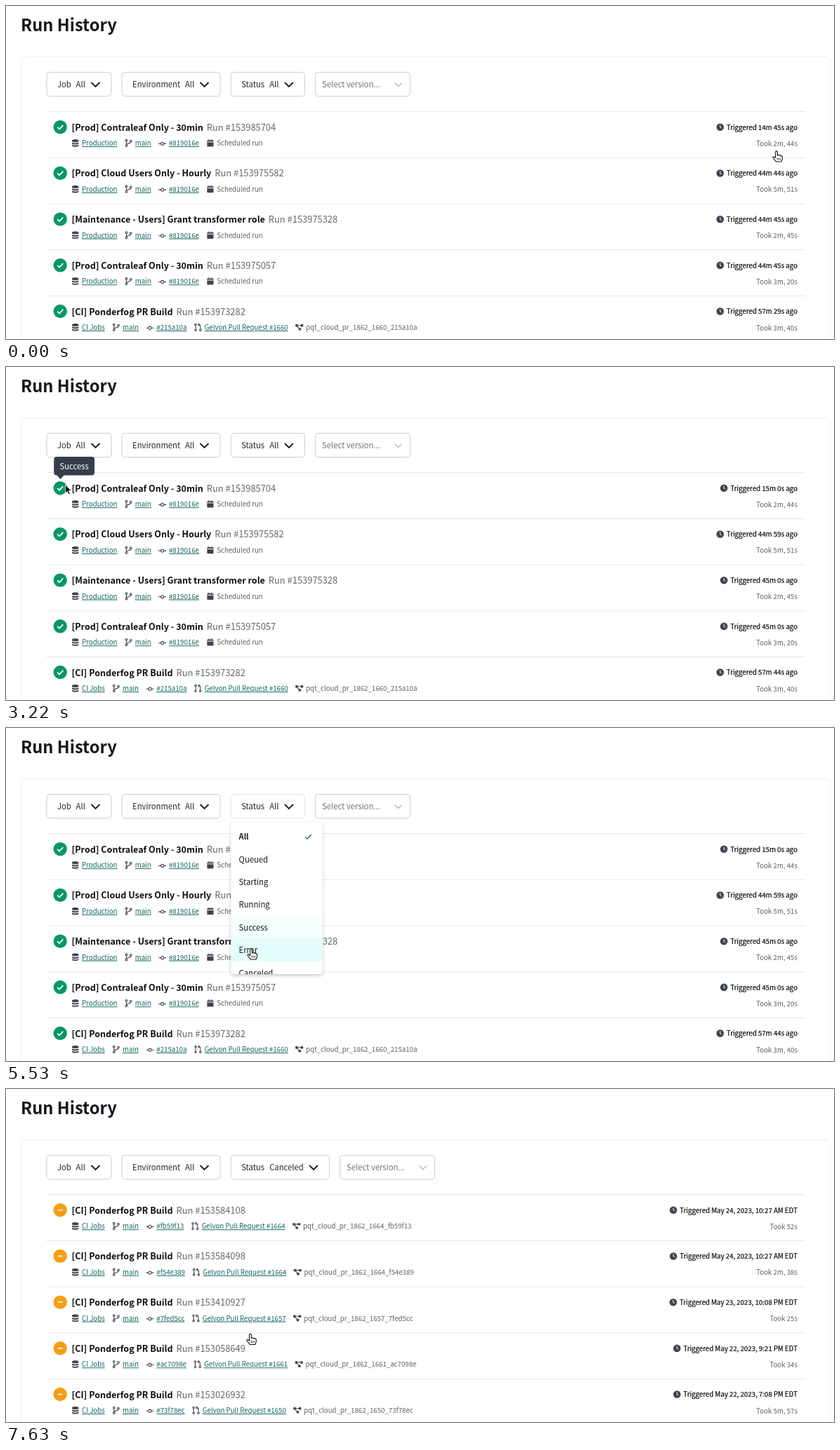
Write an HTML page that moves like this. It is 1179 by 475 pixels and loops after 8000 ms.

```html
<!DOCTYPE html>
<html lang="en">
<head>
<meta charset="utf-8">
<title>Run History</title>
<style>
  html, body { margin: 0; height: 100%; overflow: hidden; background: #fff; }
  svg { display: block; width: 100%; height: 100%; }
  text { font-family: "Noto Sans CJK JP", "Noto Sans CJK SC", "Noto Sans CJK KR", "Noto Sans", sans-serif; white-space: pre; }
  .h1 { font-size: 23.7px; font-weight: 700; fill: #15171c; }
  .title { font-size: 12.53px; font-weight: 700; fill: #0d0f12; }
  .run { font-size: 12.9px; fill: #62666e; }
  .small { font-size: 9.68px; fill: #5c6068; }
  .link { font-size: 9.68px; fill: #116560; text-decoration: underline; }
  .when { font-size: 9.68px; fill: #0b0c0e; stroke: #0b0c0e; stroke-width: .22px; }
  .ui { font-size: 11.28px; fill: #23272f; }
  .item { font-size: 11.28px; fill: #15171c; }
  .bold { font-size: 11px; font-weight: 700; fill: #15171c; }
  .hint { font-size: 11.28px; fill: #6f737b; }
  .tip { font-size: 11.28px; fill: #fff; }
  .fill { fill: #3f4450; }
  .line { fill: none; stroke: #3f4450; stroke-width: 1.1; }
</style>
</head>
<body>
<svg id="stage" viewBox="0 0 1179 475">
  <defs>
    <filter id="shade" x="-20%" y="-20%" width="140%" height="140%">
      <feDropShadow dx="0" dy="2" stdDeviation="2.5" flood-color="#000" flood-opacity=".22"/>
    </filter>
    <clipPath id="menuClip"><rect x="320.5" y="135" width="130" height="216" rx="4"/></clipPath>
  </defs>
</svg>
<script>
const NS = 'http://www.w3.org/2000/svg';
const stage = document.getElementById('stage');

function add(parent, tag, attrs = {}) {
  const el = document.createElementNS(NS, tag);
  for (const k in attrs) el.setAttribute(k, attrs[k]);
  return parent.appendChild(el);
}
const group = (parent = stage, attrs) => add(parent, 'g', attrs);
const path = (parent, d, attrs) => add(parent, 'path', { d, ...attrs });

function text(parent, str, x, y, cls, anchor = 'start') {
  const el = add(parent, 'text', { x, y, class: cls, 'text-anchor': anchor });
  el.textContent = str;
  return el.getComputedTextLength();
}

const disc = (x, y, r) => `M${x - r} ${y}a${r} ${r} 0 1 0 ${2 * r} 0a${r} ${r} 0 1 0 ${-2 * r} 0`;

// Each icon is centred on 0,0: filled shape, dark strokes, white strokes
const icons = {
  database: ['M-4.7-3.7c0-2 9.4-2 9.4 0v1c0 2-9.4 2-9.4 0z' +
    'M-4.7-.9c2 1.4 7.4 1.4 9.4 0v1.5c0 2-9.4 2-9.4 0z' +
    'M-4.7 2.4c2 1.4 7.4 1.4 9.4 0v1.4c0 2-9.4 2-9.4 0z'],
  branch: ['', disc(-3, -3.7, 1.3) + disc(-3, 3.9, 1.3) + disc(3.3, -2.7, 1.3) +
    'M-3-2.4v5M3.3-1.4C3.3 1.2-2.6.2-3 2.6'],
  commit: ['', disc(0, 1, 2.1) + 'M-5.5 1h3.4M2.1 1h3.4'],
  calendar: ['M-4.6-3.8h2v-1.4h1.3v1.4h2.6v-1.4h1.3v1.4h2v8q0 .9-.9.9h-7.4q-.9 0-.9-.9z', '', 'M-4.6-1.5h9.2'],
  pull: ['', disc(-3.4, -3.6, 1.2) + disc(-3.4, 4, 1.2) + disc(3.4, 4, 1.2) +
    'M-3.4-2.4v5.2M3.4 2.8v-4.6q0-1.8-1.8-1.8h-1.4M2-5.4L.2-3.6 2-1.8'],
  diagram: ['M-5.5-4.2h3.4v3.4h-3.4zM2.1-4.2h3.4v3.4h-3.4zM-1 1h3.4v3.4h-3.4z', 'M-2.5-2.5h5M-3.2-1.4L.4 2.4'],
  clock: [disc(0, 0, 5.3), '', 'M0-3.2v3.4l2.1 1.2']
};
function icon(parent, name, x, y) {
  const [solid, dark, light] = icons[name];
  const g = group(parent, { transform: `translate(${x} ${y})` });
  if (solid) path(g, solid, { class: 'fill' });
  if (dark) path(g, dark, { class: 'line' });
  if (light) path(g, light, { fill: 'none', stroke: '#fff' });
}

const ago = s => `Triggered ${Math.floor(s / 60)}m ${s % 60}s ago`;

function runRow(parent, i, [title, id, hash, pr, when, took], canceled) {
  const g = group(parent, { transform: `translate(0 ${i * 65.7})` });
  path(g, 'M57.5 150.7H1138', { stroke: '#e4e6e9' });
  add(g, 'circle', { cx: 77.2, cy: 172.7, r: 9.7, fill: canceled ? '#f59e14' : '#069669' });
  path(g, canceled ? 'M74 172.7h6.4' : 'M73.2 172.9l2.8 2.8 5.3-5.6',
    { fill: 'none', stroke: '#fff', 'stroke-width': 1.7 });
  const w = text(g, title, 93.5, 177.8, 'title');
  text(g, 'Run #' + id, 93.5 + w + 5, 177.8, 'run');

  const parts = [['database', pr ? 'CI Jobs' : 'Production', 'link'], ['branch', 'main', 'link'], ['commit', '#' + hash, 'link']];
  if (pr) parts.push(['pull', `Gelvon Pull Request #${pr}`, 'link'], ['diagram', `pqt_cloud_pr_1862_${pr}_${hash}`, 'small']);
  else parts.push(['calendar', 'Scheduled run', 'small']);
  let x = 98.7;
  for (const [name, label, cls] of parts) {
    icon(g, name, x, 195.4);
    x += 9.3;
    x += text(g, label, x, 199.2, cls) + 16;
  }
  const len = text(g, when, 1127, 176.6, 'when', 'end');
  icon(g, 'clock', 1127 - len - 9.2, 172.8);
  text(g, 'Took ' + took, 1127, 199.8, 'small', 'end');
}

const runs = [
  ['[Prod] Contraleaf Only - 30min', 153985704, '819016e', 0, 885, '2m, 44s'],
  ['[Prod] Cloud Users Only - Hourly', 153975582, '819016e', 0, 2684, '5m, 51s'],
  ['[Maintenance - Users] Grant transformer role', 153975328, '819016e', 0, 2685, '2m, 45s'],
  ['[Prod] Contraleaf Only - 30min', 153975057, '819016e', 0, 2685, '3m, 20s'],
  ['[CI] Ponderfog PR Build', 153973282, '215a10a', 1660, 3449, '3m, 40s']
];
const canceledRuns = [
  [153584108, 'fb59f13', 1664, '24, 2023, 10:27 AM', '52s'],
  [153584098, 'f54e389', 1664, '24, 2023, 10:27 AM', '2m, 38s'],
  [153410927, '7fed5cc', 1657, '23, 2023, 10:08 PM', '25s'],
  [153058649, 'ac7098e', 1661, '22, 2023, 9:21 PM', '34s'],
  [153026932, '73f78ec', 1650, '22, 2023, 7:08 PM', '5m, 57s']
];

function runList(delay) {
  const g = group();
  runs.forEach(([title, id, hash, pr, secs, took], i) =>
    runRow(g, i, [title, id, hash, pr, ago(secs + delay), took]));
  return g;
}

// Page frame
text(stage, 'Run History', 21, 36.3, 'h1');
add(stage, 'rect', { x: 21.5, y: 72.5, width: 1152, height: 440, rx: 7, fill: 'none', stroke: '#f3f4f5', 'stroke-width': 1.4 });

const lists = [runList(0), runList(15), group()];
canceledRuns.forEach(([id, hash, pr, day, took], i) =>
  runRow(lists[2], i, ['[CI] Ponderfog PR Build', id, hash, pr, `Triggered May ${day} EDT`, took], true));

// Filters
function filter(parent, x, width, label, value, valueX) {
  const box = add(parent, 'rect', { x, y: 94.6, width, height: 34, rx: 4.5, fill: '#fff', stroke: '#d3d6db', 'stroke-width': 1.2 });
  text(parent, label, x + (value ? 15 : 9.6), 116.2, value ? 'ui' : 'hint');
  if (value) text(parent, value, valueX, 116.2, 'ui');
  const cx = x + width - (value ? 22.5 : 16.8);
  path(parent, value ? `M${cx - 6} 109l6 6 6-6` : `M${cx - 5} 109.4l5 5 5-5`,
    { fill: 'none', stroke: value ? '#15171c' : '#b9bcc1', 'stroke-width': value ? 1.8 : 1.4 });
  return box;
}
filter(stage, 58, 92, 'Job', 'All', 99.6);
filter(stage, 165, 140, 'Environment', 'All', 255);
const filters = [group(), group()];
const statusBox = filter(filters[0], 320.2, 105.2, 'Status', 'All', 375.2);
filter(filters[0], 440.4, 135, 'Select version...');
filter(filters[1], 320.2, 140.3, 'Status', 'Canceled', 375.2);
filter(filters[1], 475.5, 135, 'Select version...');

// Status menu
const ITEM = 32.4, MENU_TOP = 138.6;
const menu = group();
add(menu, 'rect', { x: 320.5, y: 135, width: 130, height: 216, rx: 4, fill: '#fff', filter: 'url(#shade)' });
const menuBody = group(menu, { 'clip-path': 'url(#menuClip)' });
const bands = ['All', 'Queued', 'Starting', 'Running', 'Success', 'Error', 'Canceled'].map((name, i) => {
  const y = MENU_TOP + i * ITEM;
  const band = add(menuBody, 'rect', { x: 320.5, y, width: 130, height: ITEM });
  text(menuBody, name, 331.6, y + 20.6, i ? 'item' : 'bold');
  return band;
});
path(menuBody, 'M426 155.2l3 3 6-6.4', { fill: 'none', stroke: '#1d7f5c', 'stroke-width': 1.3 });

// Tooltip
const tooltip = group();
path(tooltip, 'M72.5 128H122q4 0 4 4v18.6q0 4-4 4H82.5l-5 5.4-5-5.4q-4.3 0-4.3-4V132q0-4 4.3-4z', { fill: '#353e4c' });
text(tooltip, 'Success', 76.5, 146, 'tip');

// Pointer
const pointer = group();
const ring = add(pointer, 'circle', { r: 27.3, fill: 'none', stroke: '#16181b', 'stroke-width': 1.4 });
const hand = group(pointer, { transform: 'translate(.9 0)' });
path(hand, 'M-1.7 1.3a1.4 1.4 0 0 1 2.8 0V6c.3-1 2.3-.9 2.5.3.6-.8 2.3-.5 2.4.7.8-.6 2-.1 2 1v2.6c0 2-1.3 2.6-1.3 4.4H-1.2c-.4-2-3-3.6-4-5.6-.5-1.2.8-2 1.8-1.2l1.7 1.5z',
  { fill: '#fff', stroke: '#111', 'stroke-width': 1.1, 'stroke-linejoin': 'round' });
path(hand, 'M.8 9.6v3M2.9 9.6v3M5 9.6v3', { stroke: '#111', 'stroke-width': .8 });
const arrow = path(pointer, 'M0 0V12l2.8-2.6 1.9 4.2 2-.9-1.9-4.1H8.5z', { fill: '#000', stroke: '#fff', 'stroke-width': .8 });

// Pointer tip: time, x, y
const route = [
  [350, 1096.5, 207], [1050, 86, 168], [1190, 84.5, 168],
  [3220, 84.5, 168], [3850, 344, 114],
  [4480, 344, 114], [5180, 347, 284], [5320, 347, 284],
  [5460, 348, 298], [5530, 348.5, 315], [5670, 348.5, 319], [6090, 348, 330],
  [6160, 348, 330], [6510, 352, 349.5], [6720, 352, 349.5], [6860, 347.3, 349.5]
];
const ramp = (t, a, b) => Math.min(1, Math.max(0, (t - a) / (b - a)));
const ease = p => p < .5 ? 4 * p ** 3 : 1 - 4 * (1 - p) ** 3;

function tipAt(t) {
  let [, x, y] = route[0];
  for (let i = 1; i < route.length; i++) {
    const [a, x0, y0] = route[i - 1], [b, x1, y1] = route[i];
    if (t < a) break;
    const p = ramp(t, a, b), e = b - a > 250 ? ease(p) : p;
    x = x0 + (x1 - x0) * e;
    y = y0 + (y1 - y0) * e;
  }
  return [x, y];
}
const hovered = t => Math.min(6, Math.max(0, Math.floor((tipAt(t)[1] - MENU_TOP) / ITEM)));
const show = (el, on) => el.setAttribute('display', on ? 'inline' : 'none');
const within = (t, a, b) => t >= a && t < b;

function draw(now) {
  const t = Math.floor(now % 8000 / 70) * 70;
  const [x, y] = tipAt(t);
  const open = within(t, 4060, 7140);
  const clicking = within(t, 3920, 4060) || within(t, 7000, 7140);
  const current = t < 70 ? 0 : t < 7420 ? 1 : 2;

  lists.forEach((el, i) => show(el, i === current));
  filters.forEach((el, i) => show(el, i === (t < 7140 ? 0 : 1)));
  statusBox.setAttribute('stroke', open ? '#e6e8eb' : '#d3d6db');

  show(menu, open);
  const here = hovered(t), before = hovered(t - 70);
  bands.forEach((el, i) => {
    el.setAttribute('fill', clicking ? '#d9f4f3' : '#e2fdfb');
    el.setAttribute('opacity', i === here ? 1 : i === before ? .4 : 0);
  });

  tooltip.setAttribute('opacity', ramp(t, 1190, 1400) * (1 - ramp(t, 3220, 3430)));

  const isHand = x > 320 || (x > 93 && y > 150);
  pointer.setAttribute('transform', `translate(${x} ${y})`);
  show(hand, isHand);
  show(arrow, !isHand);
  show(ring, clicking);
}

const start = performance.now();
function tick() {
  draw(performance.now() - start);
  requestAnimationFrame(tick);
}
tick();
</script>
</body>
</html>
```
